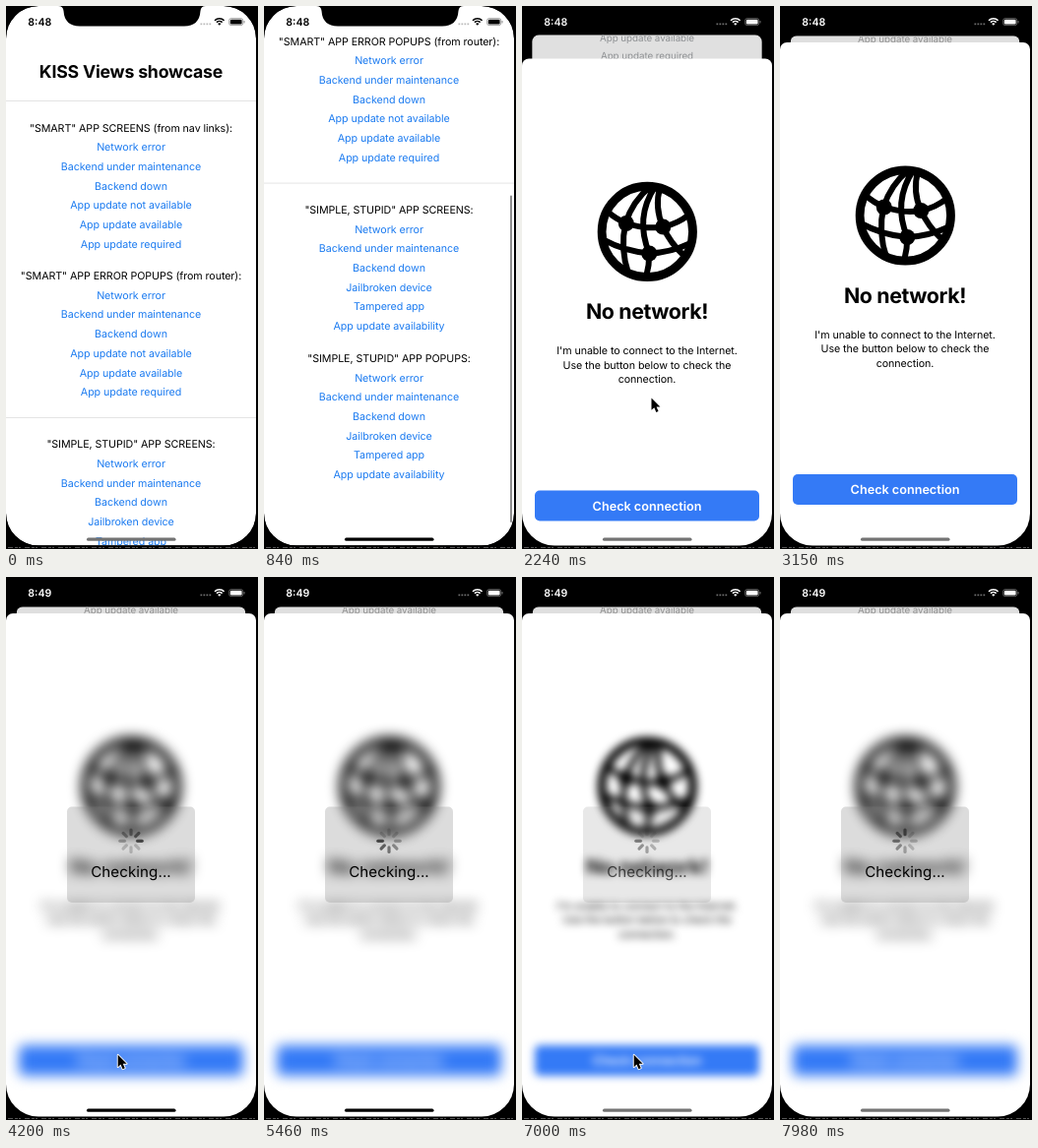
Write an HTML page with a canvas that moves like this. It is 256x552 px and loops after 8 s.

```html
<!DOCTYPE html>
<html lang="en">
<head>
<meta charset="utf-8">
<title>Views showcase</title>
<style>
html, body { margin: 0; width: 100%; height: 100%; overflow: hidden; background: #000; }
canvas { display: block; width: 256px; height: 552px; }
</style>
</head>
<body>
<canvas id="stage"></canvas>
<script>
const W = 256, H = 552, LOOP = 8000;
const SCREEN_W = 254, SCREEN_H = 548.5, CX = 127, CORNER = 33;
const MAX_SCROLL = 219, SHEET_TOP = 37, ROW = 19.7;
const FONT = 'Inter, "Liberation Sans", sans-serif';
const dpr = window.devicePixelRatio || 1;

function setup(canvas) {
  canvas.width = W * dpr;
  canvas.height = H * dpr;
  const c = canvas.getContext('2d');
  c.scale(dpr, dpr);
  c.textRendering = 'geometricPrecision';
  return c;
}
const ctx = setup(document.getElementById('stage'));
const layer = document.createElement('canvas');
const layerCtx = setup(layer);

const clamp = x => Math.min(1, Math.max(0, x));
const lerp = (a, b, p) => a + (b - a) * p;
const smooth = x => { x = clamp(x); return x * x * (3 - 2 * x); };
const ramp = (t, from, to) => smooth((t - from) / (to - from));
const within = (t, from, to) => t >= from && t < to;
// Share of the way left for a critically damped spring.
const rest = (ms, rate) => {
  const x = Math.max(0, ms) / 1000 * rate;
  return (1 + x) * Math.exp(-x);
};
const mix = (a, b, p) => `rgb(${a.map((v, i) => Math.round(lerp(v, b[i], p))).join()})`;

function text(c, str, x, y, size, color, { weight = 400, gap = 0, align = 'center' } = {}) {
  c.font = `${weight} ${size}px ${FONT}`;
  c.letterSpacing = gap + 'px';
  c.textAlign = align;
  c.fillStyle = color;
  c.fillText(str, x, y);
}
const body = (c, str, y, color) => text(c, str, CX, y, 10.7, color, { gap: -0.07 });

function box(c, x, y, w, h, r, color) {
  c.beginPath();
  c.roundRect(x, y, w, h, r);
  if (color) { c.fillStyle = color; c.fill(); }
}

const smart = ['Network error', 'Backend under maintenance', 'Backend down',
  'App update not available', 'App update available', 'App update required'];
const simple = ['Network error', 'Backend under maintenance', 'Backend down',
  'Jailbroken device', 'Tampered app', 'App update availability'];
const sections = [
  [127.5, '"SMART" APP SCREENS (from nav links):', smart],
  [278, '"SMART" APP ERROR POPUPS (from router):', smart],
  [449.3, '"SIMPLE, STUPID" APP SCREENS:', simple],
  [600.3, '"SIMPLE, STUPID" APP POPUPS:', simple]
];

function scrollAt(t) {
  const peak = 243, top = 790;
  if (t < top) return peak * ramp(t, 310, top);
  return MAX_SCROLL + (peak - MAX_SCROLL) * rest(t - top, 16);
}

function drawList(t, p) {
  const off = scrollAt(t);
  const link = mix([26, 122, 240], [165, 165, 165], p);
  ctx.fillStyle = '#fff';
  ctx.fillRect(0, 0, SCREEN_W, SCREEN_H);
  ctx.save();
  ctx.translate(0, -off);
  text(ctx, 'KISS Views showcase', CX, 72.8, 17.7, '#000', { weight: 700, gap: -0.2 });
  ctx.fillStyle = '#e4e4e4';
  ctx.fillRect(0, 96, SCREEN_W, 1);
  ctx.fillRect(0, 418, SCREEN_W, 1);
  for (const [y, head, rows] of sections) {
    body(ctx, head, y, '#000');
    rows.forEach((row, i) => body(ctx, row, y + ROW * (i + 1), link));
  }
  ctx.restore();

  const over = Math.max(0, off - MAX_SCROLL);
  const top = 33 + 140 * Math.min(1, off / MAX_SCROLL) + over;
  ctx.globalAlpha = ramp(t, 330, 430) * (1 - ramp(t, 1850, 2100));
  box(ctx, 250, top, 2, 352 - over, 1, '#8c8c8c');
  ctx.globalAlpha = 1;
}

// Ring, two parallels and three meridians, with knots where they cross.
function drawGlobe(c) {
  c.save();
  c.translate(127.3, 213);
  c.strokeStyle = c.fillStyle = '#000';
  c.lineWidth = 8.8;
  c.beginPath();
  c.arc(0, 0, 46.2, 0, 7);
  c.stroke();
  c.lineWidth = 6;
  c.stroke(new Path2D(
    'M-41-21Q-32-13-22-9Q-3-2 16-5Q31-8 43-18' +
    'M-45 8Q-23 20 2 22Q24 21 43 12' +
    'M3-46Q-15-31-22-9Q-28 17-19 43' +
    'M8-46Q-13-14 2 22Q2 34-1 45' +
    'M13-46Q7-24 16-5Q23 11 37 24'));
  for (const [x, y] of [[-21.5, -8.5], [16, -5], [2, 22]]) {
    c.beginPath();
    c.arc(x, y, 8, 0, 7);
    c.fill();
  }
  c.restore();
}

function drawContent(c) {
  drawGlobe(c);
  text(c, 'No network!', CX, 302, 21.4, '#000', { weight: 700, gap: -0.4 });
  ["I'm unable to connect to the Internet.", 'Use the button below to check the', 'connection.']
    .forEach((line, i) => body(c, line, 338 + i * 14.3, '#000'));
  box(c, 13, 476, 228, 31, 5, '#347af6');
  text(c, 'Check connection', CX, 496.3, 12.7, '#fff', { weight: 600, gap: -0.03 });
}

function drawSpinner(t) {
  const head = Math.floor(t / 100 + 0.3);
  ctx.save();
  ctx.translate(127, 268.3);
  ctx.lineWidth = 3.2;
  ctx.lineCap = 'round';
  for (let i = 0; i < 8; i++) {
    const age = (((head - i) % 8) + 8) % 8;
    ctx.strokeStyle = `rgba(50,50,50,${0.85 - 0.6 * Math.min(1, age / 5)})`;
    ctx.beginPath();
    const a = i * Math.PI / 4 - Math.PI / 2;
    ctx.moveTo(Math.cos(a) * 6.6, Math.sin(a) * 6.6);
    ctx.lineTo(Math.cos(a) * 11.2, Math.sin(a) * 11.2);
    ctx.stroke();
  }
  ctx.restore();
}

function drawSheet(t, p) {
  const busy = ramp(t, 3710, 4060) - ramp(t, 5800, 6150) + ramp(t, 6790, 7140);
  ctx.save();
  ctx.translate(0, (1 - p) * (H - SHEET_TOP));
  box(ctx, 0, SHEET_TOP, SCREEN_W, H, 7, '#fff');
  if (busy > 0.005) {
    layerCtx.clearRect(0, 0, W, H);
    drawContent(layerCtx);
    ctx.filter = `blur(${6.5 * busy * dpr}px)`;
    ctx.drawImage(layer, 0, 0, W, H);
    ctx.filter = 'none';
    ctx.globalAlpha = busy;
    box(ctx, 62, 233.5, 130, 97.5, 5, 'rgba(130,130,130,.28)');
    drawSpinner(t);
    text(ctx, 'Checking...', CX, 305.3, 15.1, '#000', { gap: 0.1 });
  } else {
    drawContent(ctx);
  }
  ctx.restore();
}

function drawStatus(t, p) {
  // Notch
  ctx.fillStyle = '#000';
  ctx.fill(new Path2D('M53 0Q58 0 58.500 5Q59.500 20.500 75 20.500H181Q196.500 20.500 197.500 5Q198 0 203 0Z'));

  const color = mix([0, 0, 0], [255, 255, 255], p);
  text(ctx, t < 3920 ? '8:48' : '8:49', 22.3, 19.8, 10.6, color, { weight: 600, align: 'left' });
  ctx.fillStyle = mix([185, 185, 185], [110, 110, 110], p);
  for (let i = 0; i < 4; i++) ctx.fillRect(197.5 + i * 3, 17.5, 1.7, 1.7);

  ctx.strokeStyle = ctx.fillStyle = color;
  ctx.lineWidth = 1.6;
  for (const r of [4, 6.8]) {
    ctx.beginPath();
    ctx.arc(216.8, 19.5, r, -Math.PI * 0.75, -Math.PI * 0.25);
    ctx.stroke();
  }
  ctx.beginPath();
  ctx.moveTo(216.8, 19.8);
  ctx.arc(216.8, 19.8, 2.4, -Math.PI * 0.75, -Math.PI * 0.25);
  ctx.fill();

  ctx.globalAlpha = 0.45;
  ctx.lineWidth = 0.8;
  box(ctx, 226.7, 12.6, 14, 7, 2);
  ctx.stroke();
  ctx.fillRect(241.5, 15, 1, 2.4);
  ctx.globalAlpha = 1;
  box(ctx, 227.8, 13.7, 11.8, 4.8, 1.2, color);
}

function drawHomeBar(t) {
  const dark = ramp(t, 450, 700) - ramp(t, 1900, 2200) + ramp(t, 3800, 4100) - ramp(t, 5500, 5900);
  box(ctx, 82, 540.6, 90.5, 3.2, 1.6, mix([115, 115, 115], [0, 0, 0], dark));
}

function drawTouch(x, y) {
  ctx.beginPath();
  ctx.arc(x, y, 13.5, 0, 7);
  ctx.fillStyle = 'rgba(120,120,120,.35)';
  ctx.fill();
}

function drawCursor(x, y) {
  ctx.save();
  ctx.translate(x, y);
  ctx.scale(0.85, 0.85);
  const arrow = new Path2D('M0 0V14.500L3.300 11.500L5.700 17L8.300 15.800L6 10.600H10.500Z');
  ctx.lineJoin = 'round';
  ctx.strokeStyle = '#fff';
  ctx.lineWidth = 2.2;
  ctx.stroke(arrow);
  ctx.fillStyle = '#000';
  ctx.fill(arrow);
  ctx.restore();
}

// Touch start, pointer shown, pointer hidden, position
const taps = [
  [1750, 1890, 3150, 131.5, 398.5],
  [3640, 3780, 5320, 113.7, 485.8],
  [6720, 6860, 7910, 113.7, 485.8]
];

function render(t) {
  ctx.fillStyle = '#000';
  ctx.fillRect(0, 0, W, H);
  ctx.strokeStyle = '#555';
  ctx.lineWidth = 1;
  ctx.setLineDash([5, 2, 3, 1, 2, 4]);
  ctx.beginPath();
  ctx.moveTo(2, 550.5);
  ctx.lineTo(W, 550.5);
  ctx.stroke();
  ctx.setLineDash([]);

  const p = t < 1840 ? 0 : t > 2590 ? 1 : 1 - rest(t - 1840, 13.2);
  ctx.save();
  box(ctx, 0, 0, SCREEN_W, SCREEN_H, CORNER, '#000');
  ctx.clip();

  ctx.save();
  const scale = lerp(1, 0.917, p);
  ctx.translate(CX * (1 - scale), 30.3 * p);
  ctx.scale(scale, scale);
  box(ctx, 0, 0, SCREEN_W, SCREEN_H, lerp(CORNER, 7, p));
  ctx.clip();
  drawList(t, p);
  ctx.fillStyle = `rgba(0,0,0,${0.125 * p})`;
  ctx.fillRect(0, 0, SCREEN_W, SCREEN_H);
  ctx.restore();

  if (p > 0) drawSheet(t, p);
  drawStatus(t, p);
  drawHomeBar(t);
  ctx.restore();

  for (const [down, show, hide, x, y] of taps) {
    if (within(t, down, show)) drawTouch(x + 1, y);
    if (within(t, show, hide)) drawCursor(x, y);
  }
}

let start;
function tick(now) {
  start ??= now;
  render((now - start) % LOOP);
  requestAnimationFrame(tick);
}
requestAnimationFrame(tick);
</script>
</body>
</html>
```
